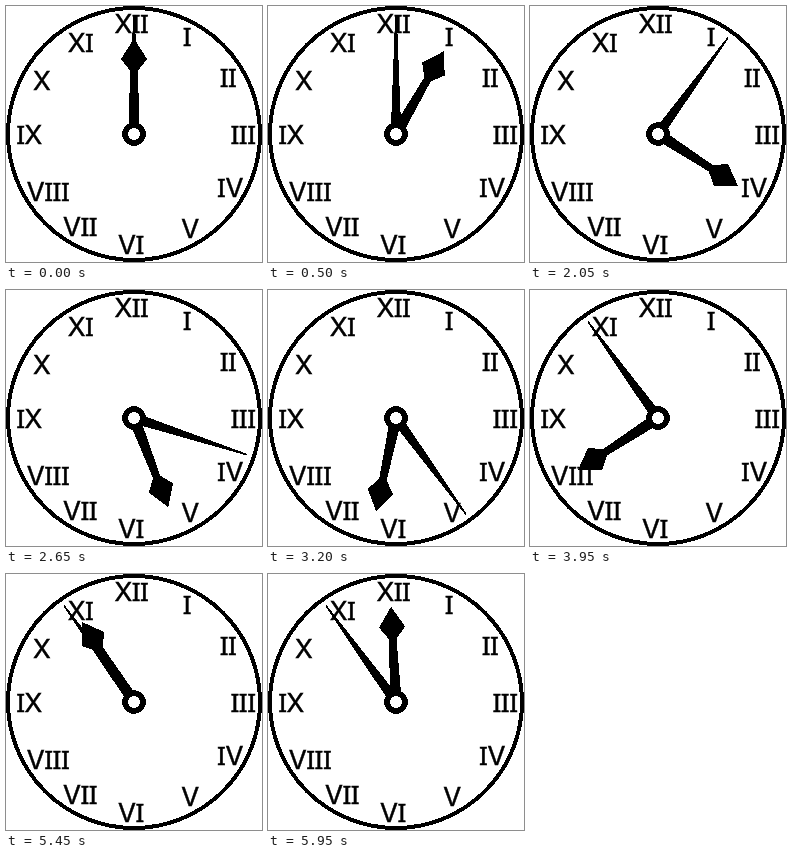
An HTML page for the animation above (6 s loop, 256x256 px).

```html
<!DOCTYPE html>
<html lang="en">
<head>
<meta charset="utf-8">
<title>Clock</title>
<style>
  html, body { margin: 0; width: 100%; height: 100%; overflow: hidden; background: #fff; }
  svg { display: block; width: 100vw; height: 100vh; }
  circle, path { shape-rendering: crispEdges; }
  text {
    font: 26px Inter, "Liberation Sans", sans-serif;
    letter-spacing: -.5px;
    text-anchor: middle;
    stroke: #000;
    stroke-width: .5;
  }
  .bar { font-family: "Noto Sans", "DejaVu Sans", sans-serif; }
</style>
</head>
<body>
<svg viewBox="0 0 256 256">
  <circle cx="128" cy="128" r="126" fill="#fff" stroke="#000" stroke-width="4"/>
  <g id="numerals"></g>
  <g transform="translate(128 128)">
    <path id="minute" d="M-5-9L-3.2-56L-.8-119H.8L3.2-56L5-9Z"/>
    <path id="hour" d="M-5.5-9L-3.8-63L-13-75L0-95.5L13-75L3.8-63L5.5-9Z"/>
    <circle r="8.9" fill="#fff" stroke="#000" stroke-width="5.8"/>
  </g>
</svg>
<script>
  const LOOP = 6000, STEP = 50, STEPS = LOOP / STEP;
  const $ = id => document.getElementById(id);

  // Label and the centre of each numeral.
  const numerals = [
    ["XII", 125.5, 18], ["I", 181, 31], ["II", 222, 72], ["III", 237, 128.5],
    ["IV", 224, 182], ["V", 184, 223], ["VI", 125, 238.5], ["VII", 74, 221],
    ["VIII", 42, 186], ["IX", 23, 128.5], ["X", 35.5, 75], ["XI", 74.5, 37]
  ];

  // The letter I takes a face that gives it top and bottom bars.
  $("numerals").innerHTML = numerals.map(([label, x, y]) => {
    const text = label.replace(/I+/, run => `<tspan class="bar">${run}</tspan>`);
    return `<text x="${x}" y="${y + 9.2}">${text}</text>`;
  }).join("");

  const turn = (id, deg) => $(id).setAttribute("transform", `rotate(${deg % 360})`);

  // Each step advances the clock by six minutes.
  function draw() {
    const step = Math.floor(performance.now() % LOOP / STEP) % STEPS;
    turn("minute", step * 36);
    turn("hour", step * 3);
    requestAnimationFrame(draw);
  }
  draw();
</script>
</body>
</html>
```
